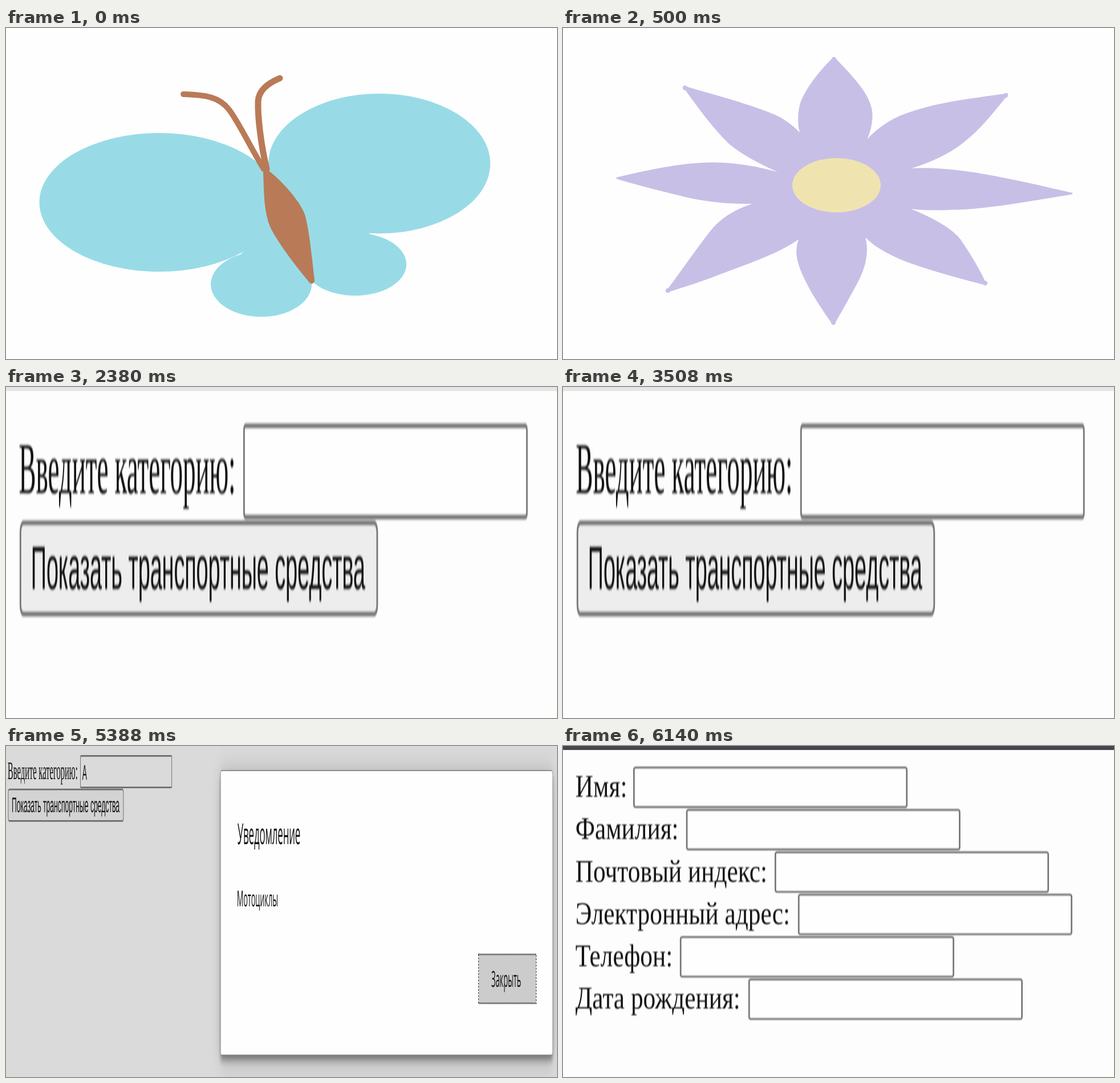
Animation, 966 px wide and 580 px high, one loop 8 s. Source, as an HTML page:

```html
<!DOCTYPE html>
<html lang="ru">
<head>
<meta charset="utf-8">
<title>Слайды</title>
<style>
  html, body { margin: 0; width: 100%; height: 100%; overflow: hidden; background: #fefefe; }
  svg { display: block; width: 100%; height: 100%; }
  .scene { display: none; }
  .scene.on { display: inline; }
  text { font: 16px "Liberation Serif", "Times New Roman", serif; fill: #111; text-rendering: geometricPrecision; }
  .ui { font: 13.42px "Liberation Sans", Arial, sans-serif; }
  .note { font: 14px "Open Sans", "Noto Sans", sans-serif; }
  .title { font-size: 18.4px; }
  .field { fill: #fefefe; stroke: #767676; }
  .button { fill: #ededed; stroke: #767676; }
  .dim .field { fill: #dadada; stroke: #6c6c6c; }
  .dim .button { fill: #d3d3d3; stroke: #6c6c6c; }
</style>
</head>
<body>
<svg viewBox="0 0 966 580">
  <defs>
    <filter id="shade" x="-20%" y="-30%" width="140%" height="160%">
      <feDropShadow dx="0" dy="3" stdDeviation="2.5" flood-color="#000" flood-opacity=".4"/>
      <feDropShadow dx="0" dy="2" stdDeviation="9" flood-color="#000" flood-opacity=".22"/>
    </filter>
    <!-- enlarged screenshots look slightly soft -->
    <filter id="soft" color-interpolation-filters="sRGB">
      <feGaussianBlur stdDeviation=".25"/>
    </filter>
  </defs>

  <g class="scene on">
    <g fill="#98dbe7">
      <ellipse cx="268.5" cy="305.5" rx="210" ry="121.5"/>
      <ellipse cx="654.5" cy="237.5" rx="194.5" ry="122.5"/>
      <ellipse cx="447.5" cy="449" rx="88.5" ry="57"/>
      <ellipse cx="612" cy="414" rx="90" ry="55"/>
      <path d="M411 397L433 375L470 290L530 250L540 330L638 360L570 400L536 446L480 405Z"/>
    </g>
    <g fill="none" stroke="#b97a57" stroke-width="10" stroke-linecap="round" stroke-linejoin="round">
      <path d="M311 116C350 117 374 121 391 143S430 212 452 247"/>
      <path d="M480 88C456 98 443 111 442 128C441 155 447 205 457 247" stroke-width="11"/>
      <path d="M456 253C474 266 509 302 519 328C526 350 531 400 536 443C520 424 480 374 467 345C457 320 457 285 456 253Z" fill="#b97a57"/>
    </g>
  </g>

  <g class="scene">
    <path fill="#c8bfe7" stroke="#c8bfe7" stroke-width="3" stroke-linejoin="round" d="M475 52
      C500 80 540 115 541 152C541 175 533 195 525 207
      C545 180 575 160 605 150C660 130 730 123 779 116C755 145 730 180 690 208C660 228 625 241 595 249
      C680 238 800 270 892 290C820 302 735 317 680 317C650 319 620 317 598 314
      C640 330 680 350 697 373C712 395 730 425 741 449C690 436 630 420 590 403C560 390 540 377 527 361
      C535 385 533 410 518 440C505 465 488 495 474 519C450 485 420 440 412 405C409 390 411 378 416 366
      C380 395 300 420 265 434C235 446 210 453 182 462C210 425 240 380 265 350C285 328 310 316 343 306
      C300 308 265 305 225 297C180 286 140 277 95 263C150 250 205 238 260 237C310 236 355 248 396 259
      C350 240 315 222 290 200C260 170 235 135 212 103C255 116 330 135 375 155C395 165 408 178 419 189
      C412 175 412 150 418 130C430 100 455 72 475 52Z"/>
    <path fill="none" stroke="#c8bfe7" stroke-width="8" stroke-linecap="round" d="M475 55v0M474 516v0M214 105v0M184 460v0M740 447v0M776 118v0"/>
    <ellipse cx="479.5" cy="275.5" rx="77.5" ry="47.5" fill="#efe4b0"/>
  </g>

  <g class="scene">
    <path fill="#fdfdfd" d="M0 0h966v580H0z"/>
    <path fill="#e6e6e6" d="M0 0h966v7H0z"/>
    <g id="search" transform="scale(2.81 8)" filter="url(#soft)"></g>
  </g>

  <g class="scene dim">
    <path fill="#dadada" d="M0 0h966v580H0z"/>
    <g transform="translate(-4.2 -6) scale(.907 2.76)">
      <g id="found"></g>
      <text class="ui" x="152" y="23.6">A</text>
      <rect x="419.5" y="17.8" width="641.5" height="180.6" rx="2" fill="#fefefe" filter="url(#shade)"/>
      <rect x="419.5" y="17.8" width="641.5" height="180.6" rx="2" fill="none" stroke="#888" stroke-width=".6"/>
      <text class="note title" x="452" y="64.5">Уведомление</text>
      <text class="note" x="451" y="104">Мотоциклы</text>
      <rect x="918" y="134.5" width="111.5" height="31" fill="#ccc" stroke="#111" stroke-dasharray="1 1"/>
      <text class="note" x="943" y="155">Закрыть</text>
    </g>
  </g>

  <g class="scene">
    <path fill="#fdfdfd" d="M0 0h966v580H0z"/>
    <path fill="#46444d" d="M0 0h966v7H0z"/>
    <g id="person" transform="translate(0 8.2) scale(2.71 3.47)" filter="url(#soft)"></g>
  </g>
</svg>
<script>
  const $ = id => document.getElementById(id);

  const row = (label, x, y) => `<text x="8" y="${y + 15.3}">${label}</text>
    <rect class="field" x="${x + .5}" y="${y + .5}" width="176.5" height="20" rx="1"/>`;

  $('search').innerHTML = $('found').innerHTML = row('Введите категорию:', 148, 8) +
    `<rect class="button" x="9" y="29.75" width="222.6" height="20" rx="2"/>
     <text class="ui" x="15.6" y="44.3">Показать транспортные средства</text>`;

  $('person').innerHTML = [
    ['Имя:', 45.4], ['Фамилия:', 79.6], ['Почтовый индекс:', 136.9],
    ['Электронный адрес:', 152], ['Телефон:', 75.6], ['Дата рождения:', 119.9]
  ].map(([label, x], i) => row(label, x, 8 + i * 21.4)).join('');

  const scenes = document.querySelectorAll('.scene');
  const starts = [0, 500, 2380, 4260, 6140];

  function draw(now) {
    const t = now % 8000;
    const current = starts.filter(s => s <= t).length - 1;
    scenes.forEach((s, i) => s.classList.toggle('on', i === current));
    requestAnimationFrame(() => draw(performance.now()));
  }
  draw(performance.now());
</script>
</body>
</html>
```
